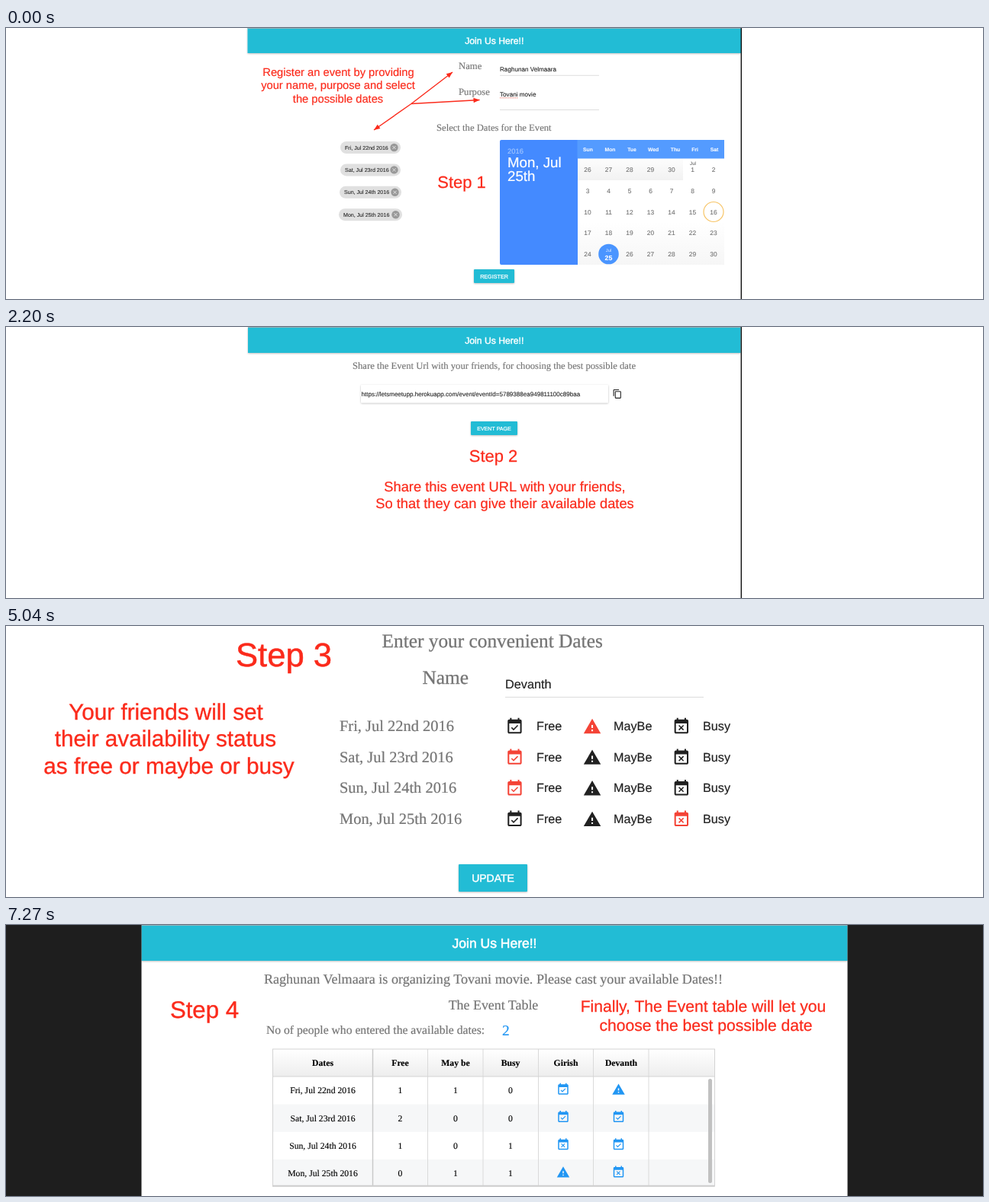
An HTML page that plays this animation: 1280 px wide and 356 px high, repeating every 8000 ms.

```html
<!DOCTYPE html>
<html lang="en">
<head>
<meta charset="utf-8">
<title>Event planner walkthrough</title>
<style>
html, body { margin: 0; width: 100%; height: 100%; overflow: hidden; background: #fff; }
svg { display: block; width: 1280px; height: 356px; text-rendering: geometricPrecision; }
text { font-family: "Liberation Sans", Arial, sans-serif; white-space: pre; stroke-width: .012em; }
.serif { font-family: "Liberation Serif", Times, serif; }
.medium { stroke-width: .035em; }
.bold { font-weight: 700; }
</style>
</head>
<body>
<svg id="stage" viewBox="0 0 1280 356">
<defs>
<linearGradient id="fade" x2="0" y2="1"><stop stop-color="#fdfdfd"/><stop offset="1" stop-color="#f2f2f2"/></linearGradient>
<linearGradient id="soft" x2="0" y2="1"><stop stop-color="#fff"/><stop offset="1" stop-color="#f6f6f6"/></linearGradient>
<linearGradient id="head" x2="0" y2="1"><stop stop-color="#fff"/><stop offset="1" stop-color="#ededed"/></linearGradient>
<filter id="shadow" x="-20%" y="-30%" width="140%" height="180%"><feDropShadow dx="0" dy=".8" stdDeviation="1.2" flood-opacity=".28"/></filter>
</defs>
</svg>
<script>
const CYAN = '#22bcd5', RED = '#fb2a1b', GREY = '#757575', INK = '#212121', BLUE = '#2196f3';
const APP = 'Join Us Here!!', HOST = 'Raghunan Velmaara', FILM = 'Tovani movie';
const GUESTS = ['Girish', 'Devanth'];
const DATES = ['Fri, Jul 22nd 2016', 'Sat, Jul 23rd 2016', 'Sun, Jul 24th 2016', 'Mon, Jul 25th 2016'];

const each = (list, fn) => list.map(fn).join('');
const rect = (x, y, w, h, fill, extra = '') =>
  `<rect x="${x}" y="${y}" width="${w}" height="${h}" fill="${fill}" ${extra}/>`;
const circle = (x, y, r, fill, extra = '') =>
  `<circle cx="${x}" cy="${y}" r="${r}" fill="${fill}" ${extra}/>`;
const line = (x1, y1, x2, y2, stroke, width = 1, extra = '') =>
  `<path d="M${x1} ${y1}L${x2} ${y2}" stroke="${stroke}" stroke-width="${width}" ${extra}/>`;
const text = (str, x, y, size, fill, cls = '', anchor = 'start') =>
  `<text x="${x}" y="${y}" font-size="${size}" fill="${fill}" stroke="${fill}" class="${cls}" text-anchor="${anchor}">${str}</text>`;
const mid = (str, x, y, size, fill, cls) => text(str, x, y, size, fill, cls, 'middle');

const page = 'M19 3h-1V1h-2v2H8V1H6v2H5c-1.1 0-2 .9-2 2v14c0 1.1.9 2 2 2h14c1.1 0 2-.9 2-2V5c0-1.1-.9-2-2-2zm0 16H5V8h14v11z';
const ICONS = {
  free: 'M16.53 11.06L15.47 10l-4.88 4.88-2.12-2.12-1.06 1.06L10.59 17l5.94-5.94z' + page,
  busy: 'M9.31 17l2.44-2.44L14.19 17l1.06-1.06-2.44-2.44 2.44-2.44L14.19 10l-2.44 2.44L9.31 10l-1.06 1.06 2.44 2.44-2.44 2.44z' + page,
  maybe: 'M1 21h22L12 2 1 21zm12-3h-2v-2h2v2zm0-4h-2v-4h2v4z',
  copy: 'M16 1H4c-1.1 0-2 .9-2 2v14h2V3h12V1zm3 4H8c-1.1 0-2 .9-2 2v14c0 1.1.9 2 2 2h11c1.1 0 2-.9 2-2V7c0-1.1-.9-2-2-2zm0 16H8V7h11v14z'
};
const icon = (name, x, y, scale, fill) =>
  `<path d="${ICONS[name]}" transform="translate(${x} ${y}) scale(${scale})" fill="${fill}" fill-rule="evenodd"/>`;

const button = (label, x, y, w, h, size) =>
  rect(x, y, w, h, CYAN, 'rx="1" filter="url(#shadow)"') +
  mid(label, x + w / 2, y + h / 2 + size * .36, size, '#fff', 'medium');

const header = (x, w, h, size, baseline) =>
  rect(x, 0, w, h, CYAN, 'filter="url(#shadow)"') + rect(x, 0, w, 1, '#8fb3ba') +
  mid(APP, x + w / 2, baseline, size, '#fff', 'medium');

function arrow(x1, y1, x2, y2) {
  const angle = Math.atan2(y2 - y1, x2 - x1) * 180 / Math.PI;
  return line(x1, y1, x2, y2, RED, 1.4) +
    `<path d="M0 0L-8 -3.2V3.2Z" fill="${RED}" transform="translate(${x2} ${y2}) rotate(${angle})"/>`;
}

function chip(label, i) {
  const y = 157 + i * 29.4, w = [79, 79, 81, 83][i], x = 477.5 - w / 2, cx = x + w - 8.5;
  return rect(x, y - 8, w, 16, '#e0e0e0', 'rx="8"') + text(label, x + 6, y + 2.6, 7.1, INK) +
    circle(cx, y, 5.2, '#999') +
    `<path d="M${cx - 2} ${y - 2}l4 4m0-4l-4 4" stroke="#e4e4e4"/>`;
}

function calendar() {
  const colX = i => 762 + i * 27.5, rowY = i => 186 + i * 27.8;
  const weekX = [762.5, 791.5, 820, 848, 877, 902.5, 928];
  let out = rect(647, 147, 294, 164, '#fff') + rect(749, 255, 192, 56, 'url(#soft)') +
    rect(749, 171, 138, 29, 'url(#fade)') +
    `<path d="M749 147H649q-2 0-2 2V309q0 2 2 2H749Z" fill="#448aff"/>` +
    rect(748.5, 147, 192.5, 24.5, '#549bff') +
    text('2016', 657, 164.5, 9.4, '#a5c8ff') +
    text('Mon, Jul', 657, 183, 18.7, '#fff') + text('25th', 657, 201, 18.7, '#fff') +
    each(['Sun', 'Mon', 'Tue', 'Wed', 'Thu', 'Fri', 'Sat'], (d, i) => mid(d, weekX[i], 162, 6.8, '#fff', 'bold')) +
    circle(927, 241.5, 13, 'none', 'stroke="#f7c568" stroke-width="1.2"') +
    circle(789.5, 297, 13.3, '#4a95ff') +
    mid('Jul', 900, 180, 6.2, '#666') + mid('Jul', 789.5, 294, 5.8, '#cfe2ff');
  for (let i = 0; i < 35; i++) {
    const day = i < 5 ? 26 + i : i - 4, x = colX(i % 7), y = rowY(Math.floor(i / 7)) + 3;
    out += day === 25 && i > 5 ? mid(day, 789.5, 304.5, 8.8, '#fff', 'bold') : mid(day, x, y, 8.4, '#707070');
  }
  return out;
}

const edge = () => rect(962.6, 0, 1.4, 356, '#111');

const register = () => header(316.5, 646.5, 33, 12.2, 21) + edge() +
  mid('Register an event by providing', 435.5, 63, 14.7, RED) +
  mid('your name, purpose and select', 435, 80, 14.7, RED) +
  mid('the possible dates', 435, 97.5, 14.7, RED) +
  arrow(531, 99.5, 585, 58) + arrow(531, 99.5, 620.5, 94.5) + arrow(531, 99.5, 482, 134) +
  text('Name', 593, 54, 12.7, GREY, 'serif') + text('Purpose', 593, 87.5, 12.7, GREY, 'serif') +
  text(HOST, 647, 57, 8.15, INK) + text(FILM, 647, 90.3, 8.15, INK) +
  line(647, 91.8, 671, 91.8, '#f0685c', 1, 'stroke-dasharray="1.2 1"') +
  line(647, 62.3, 777, 62.3, '#dedede') + line(647, 107.5, 777, 107.5, '#dedede') +
  text('Select the Dates for the Event', 564, 135, 12.65, GREY, 'serif') +
  each(DATES, chip) + mid('Step 1', 597, 210, 21.9, RED) + calendar() +
  button('REGISTER', 613, 317, 53, 18, 7.2);

const share = () => header(317, 645.5, 34, 12.2, 22) + edge() +
  mid('Share the Event Url with your friends, for choosing the best possible date', 639.5, 55, 12.65, GREY, 'serif') +
  rect(465, 76, 324, 23.5, '#fff', 'rx="1" filter="url(#shadow)"') +
  text('https://letsmeetupp.herokuapp.com/event/eventId=5789388ea949811100c89baa', 465.5, 90.5, 8.05, INK) +
  icon('copy', 794.5, 81.5, .54, INK) +
  button('EVENT PAGE', 609, 124, 61, 18, 7.1) +
  mid('Step 2', 638.5, 177, 21.9, RED) +
  mid('Share this event URL with your friends,', 653.5, 216, 18.3, RED) +
  mid('So that they can give their available dates', 653.5, 238, 18.3, RED);

function answerRow(date, i) {
  const y = 132 + i * 40.6, chosen = ['maybe', 'free', 'free', 'busy'][i];
  const option = (name, label, x, labelX) =>
    icon(name, x, y - 12.2, 1.02, name === chosen ? '#f44336' : INK) + text(label, labelX, y + 5, 16.2, INK);
  return text(date, 437, y + 6, 20.45, GREY, 'serif') +
    option('free', 'Free', 654.2, 695) + option('maybe', 'MayBe', 755.8, 796) + option('busy', 'Busy', 872.6, 913);
}

const answer = () => text('Enter your convenient Dates', 492.5, 28.3, 25.35, GREY, 'serif') +
  text('Name', 545.5, 76.3, 25.35, GREY, 'serif') + text(GUESTS[1], 654, 82, 16.3, INK) +
  line(654, 93.5, 914, 93.5, '#dcdcdc') + each(DATES, answerRow) +
  button('UPDATE', 593, 313, 90, 36, 14) +
  mid('Step 3', 364, 53.3, 43.6, RED) +
  mid('Your friends will set', 209.5, 122.5, 29.7, RED) +
  mid('their availability status', 209, 158, 29.7, RED) +
  mid('as free or maybe or busy', 213.5, 193.5, 29.7, RED);

function table() {
  const xs = [415, 516.5, 589, 661, 733.5, 806];
  const rows = [
    [1, 1, 0, 'free', 'maybe'], [2, 0, 0, 'free', 'free'],
    [1, 0, 1, 'busy', 'free'], [0, 1, 1, 'maybe', 'busy']
  ];
  const cell = (v, x, y) => ICONS[v] ? icon(v, x - 12.5, y - 10.5, .75, BLUE) : mid(v, x, y + 4, 11.7, '#000', 'serif');
  return rect(349.5, 163, 579, 36, 'url(#head)') +
    each([235.5, 308], y => rect(349.5, y, 579, 36.2, '#f6f7f8')) +
    each([480.5, 552.5, 625, 697.5, 769.5, 842], (x, i) => line(x, 163, x, 343, i ? '#dadada' : '#c8c8c8', i ? 1 : 1.4)) +
    line(349, 199, 928, 199, '#d3d3d3') +
    rect(349.5, 163, 579, 180, 'none', 'stroke="#d3d3d3"') + line(349, 342.8, 928.5, 342.8, '#cfcfcf', 2) +
    each(['Dates', 'Free', 'May be', 'Busy', ...GUESTS], (h, i) => mid(h, xs[i], 185, 11.7, '#000', 'serif bold')) +
    each(rows, (row, r) => each([DATES[r], ...row], (v, c) => cell(v, xs[c], 217.4 + r * 36.25))) +
    rect(920, 202, 5, 137, '#c1c1c1', 'rx="2.5"');
}

const result = () => header(177.5, 925, 47, 17.5, 30) +
  rect(0, 0, 177.5, 356, '#1e1e1e') + rect(1102.5, 0, 177.5, 356, '#1e1e1e') +
  mid(`${HOST} is organizing ${FILM}. Please cast your available Dates!!`, 638.5, 77, 18.1, GREY, 'serif') +
  mid('The Event Table', 638.5, 110.7, 17.9, GREY, 'serif') +
  text('No of people who entered the available dates:', 341, 142.5, 15.65, GREY, 'serif') +
  text('2', 650, 145, 19.5, BLUE, 'serif') +
  mid('Step 4', 260, 122, 31.2, RED) +
  mid('Finally, The Event table will let you', 913.5, 114, 21.1, RED) +
  mid('choose the best possible date', 917, 139, 21.1, RED) + table();

const stage = document.getElementById('stage');
stage.insertAdjacentHTML('beforeend', each([register, share, answer, result], scene => `<g class="scene">${scene()}</g>`));
const scenes = [...stage.querySelectorAll('.scene')];
const ENDS = [500, 3340, 6180, 8000];

function draw() {
  const time = performance.now() % 8000;
  const current = ENDS.findIndex(end => time < end);
  scenes.forEach((g, i) => g.style.display = i === current ? '' : 'none');
  requestAnimationFrame(draw);
}
draw();
</script>
</body>
</html>
```
